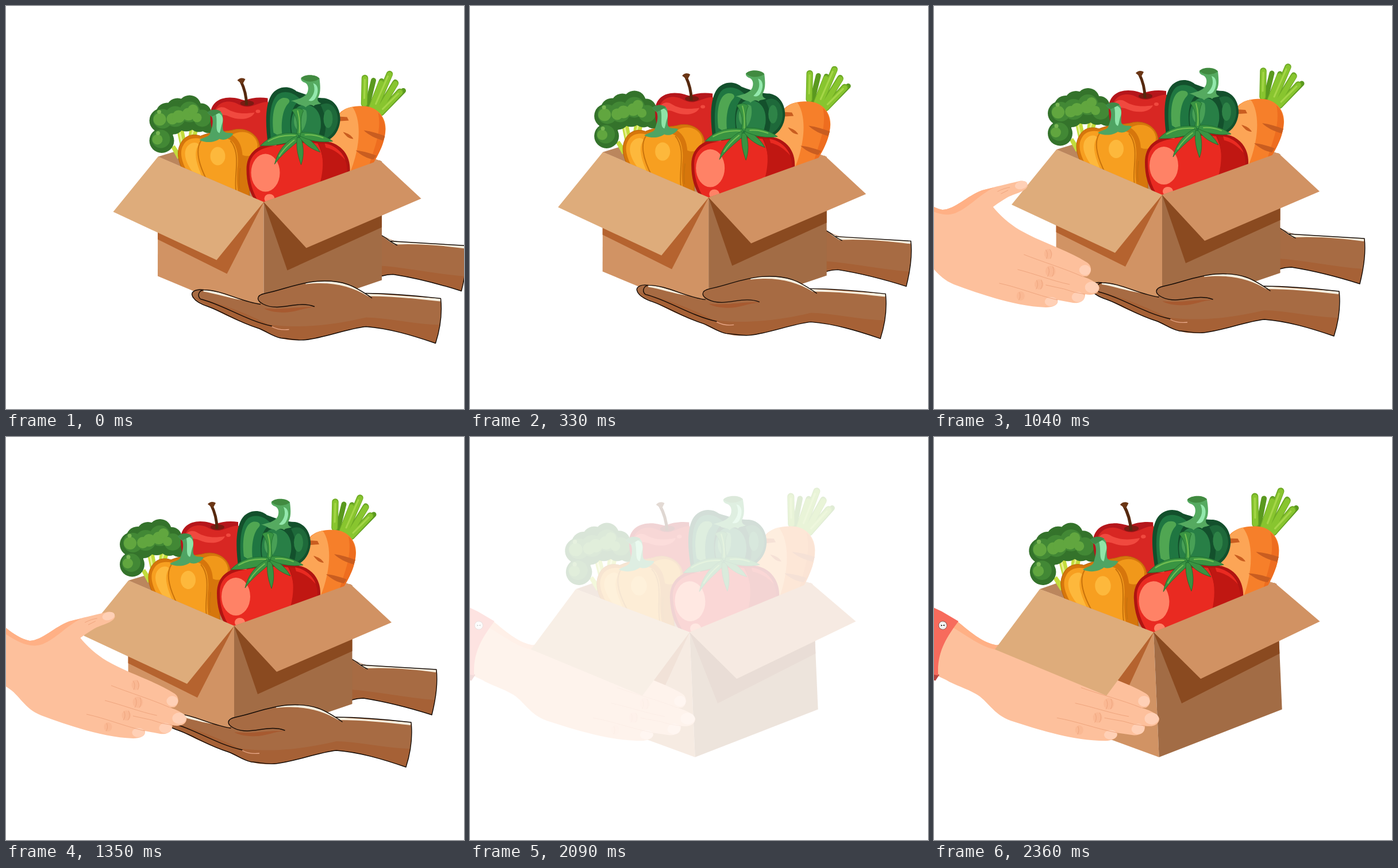
Animation, 797 px wide and 702 px high, one loop 3.46 s. Source, as an HTML page:

```html
<!DOCTYPE html>
<html lang="en">
<head>
<meta charset="utf-8">
<title>Food box</title>
<style>
html, body { margin: 0; width: 100%; height: 100%; overflow: hidden; background: #fff; }
svg { display: block; width: 100vw; height: 100vh; }
.ink { fill: none; stroke: #140b06; stroke-width: 1.4; stroke-linecap: round; stroke-linejoin: round; }
.crease { fill: none; stroke: #eda27b; stroke-width: .9; stroke-linecap: round; }
.stalk { fill: none; stroke-linecap: round; }
</style>
</head>
<body>
<svg viewBox="0 0 797 702">
<defs>
  <g id="broccoli">
    <path fill="#c3dc3c" d="M246 205L257 200 265 240 255 248ZM268 200L284 198 278 222 264 230ZM236 234L242 230 254 248 247 254Z"/>
    <path fill="#e6ef8a" d="M249 206L252 205 259 238 256 240ZM273 203L276 203 271 221 268 222Z"/>
    <g fill="#34732b">
      <circle cx="219.500" cy="222" r="21.500"/><circle cx="219" cy="187" r="21"/><circle cx="229" cy="176" r="20"/>
      <circle cx="247" cy="168" r="20"/><circle cx="268" cy="163" r="20"/><circle cx="288" cy="175" r="18"/>
      <circle cx="302" cy="189" r="20"/><circle cx="262" cy="186" r="20"/><circle cx="240" cy="193" r="18"/>
      <circle cx="284" cy="189" r="18"/><circle cx="224" cy="204" r="17"/>
    </g>
    <g fill="#428835">
      <circle cx="218" cy="219" r="16"/><circle cx="221" cy="184" r="17"/><circle cx="243" cy="180" r="18"/>
      <circle cx="268" cy="172" r="18"/><circle cx="290" cy="183" r="15"/>
    </g>
    <g fill="#61a63f">
      <circle cx="212" cy="220" r="9"/><circle cx="216" cy="185" r="11"/><circle cx="238" cy="184" r="10"/>
      <circle cx="249" cy="180" r="11"/><circle cx="266" cy="176" r="11"/><circle cx="274" cy="168" r="9"/>
      <circle cx="281" cy="182" r="8"/>
    </g>
    <g fill="#78b653"><circle cx="215" cy="172" r="3.500"/><circle cx="213" cy="209" r="3.500"/></g>
  </g>

  <g id="apple">
    <path fill="#b5161b" d="M304 176C305 158 318 147 338 147C350 147 356 150 364 152C376 147 390 146 404 148V240H325C310 220 303 196 304 176Z"/>
    <path fill="#d82723" d="M309 180C311 163 322 153 338 154C352 155 356 164 371 163C385 160 395 153 405 155V235H325C314 215 308 195 309 180Z"/>
    <path fill="#f0493f" d="M313 171C316 163 326 162 332 166C346 175 362 176 381 173C376 186 352 187 337 180C327 175 319 180 313 171Z"/>
    <ellipse cx="387" cy="171" rx="4" ry="3" fill="#f0493f"/>
    <ellipse cx="368" cy="157" rx="12" ry="5" fill="#7c1a12"/>
    <path fill="none" stroke="#56290f" stroke-width="5" d="M357 118C364 132 367 145 367 160"/>
    <path fill="#6b3615" d="M351 117C355 112 361 112 365 115L360 124Z"/>
  </g>

  <g id="carrot">
    <path class="stalk" stroke="#5a991f" stroke-width="9" d="M577 162L588 117M586 165L602 118M595 170L626 120M602 174L640 135"/>
    <path class="stalk" stroke="#6fab25" stroke-width="11.500" d="M572 158L573 113M585 164L602 121M590 167L616 106M597 170L626 122M601 173L634 137"/>
    <path class="stalk" stroke="#88c52f" stroke-width="9" d="M572 158L573 114M585 164L601 122M590 167L616 107M597 170L626 123M601 173L634 138"/>
    <path class="stalk" stroke="#a5d648" stroke-width="3" d="M572 148L573 116M592 158L613 110M604 167L631 140"/>
    <path fill="#f67f2a" d="M525 180C533 165 552 161 572 162C594 163 610 180 609 203C608 226 594 251 579 276L548 290C520 275 508 240 514 214C516 200 521 190 525 180Z"/>
    <path fill="#fca556" d="M526 180C532 170 541 165 551 163C568 186 566 236 544 285C520 275 508 240 514 214C516 200 521 190 526 180Z"/>
    <path fill="#ee6d1f" d="M596 173C612 188 611 215 600 238C594 252 586 264 578 276C584 244 604 212 596 173Z"/>
    <path fill="#c95d20" d="M571 204C585 206 597 210 608 214L605 222C592 218 580 213 571 204ZM557 239C570 240 582 244 593 248L588 255C576 253 566 247 557 239ZM527 180L542 181 545 187 530 188ZM535 207C543 209 550 213 553 219C545 219 540 214 535 207Z"/>
  </g>

  <g id="greenPepper">
    <path fill="#13502c" d="M405 232C399 190 400 160 410 143C420 127 441 125 454 136C470 142 488 148 503 148C521 151 531 168 530 187C528 208 516 220 500 226Z"/>
    <path fill="#1f7641" d="M410 222C405 185 408 152 422 141C437 132 455 142 461 151C443 162 439 190 447 224Z"/>
    <path fill="#50a652" d="M414 208C410 176 416 152 429 148C439 146 445 152 440 157C429 168 426 194 430 218Z"/>
    <path fill="#287f46" d="M450 225C438 188 448 163 464 160C484 157 499 172 496 200L490 225Z"/>
    <path fill="#48a056" d="M450 182C453 168 466 164 471 170C474 182 470 200 462 207C452 204 448 193 450 182Z"/>
    <path fill="#1e693a" d="M496 160C514 150 527 168 526 187C524 206 512 216 500 221C507 204 507 181 496 160Z"/>
    <ellipse cx="509" cy="184" rx="8" ry="16" fill="#2e8347"/>
    <path fill="#55aa60" d="M462 113C468 107 488 106 494 114C496 130 496 140 491 148C490 153 493 156 497 157C490 160 487 158 484 162C479 158 474 160 470 164C466 159 459 161 455 157C451 155 446 152 443 153C455 150 468 148 473 138C476 130 474 122 466 120C463 118 461 116 462 113Z"/>
    <path fill="#94e8ad" d="M483 122C494 125 492 140 487 148C484 153 479 154 475 152C486 142 487 132 483 122Z"/>
    <path fill="#418a40" d="M462 113C468 106 488 106 494 114C487 120 470 122 462 113Z"/>
  </g>

  <g id="orangePepper">
    <path fill="#d6760c" stroke="#ba640a" d="M262 285C249 262 243 243 253 226C260 213 274 209 287 214C305 206 325 207 341 204C366 196 391 212 390 236C390 262 382 285 372 297V340H300Z"/>
    <path fill="#f1981a" d="M342 212C358 202 382 207 386 228C387 244 373 253 360 247C359 232 354 220 342 212Z"/>
    <path fill="#f79f20" d="M268 284C255 262 249 243 257 230C263 218 277 216 288 219C305 212 325 213 335 219C351 224 354 250 351 272C350 290 350 305 354 320L290 300Z"/>
    <path fill="#fdb83c" d="M261 238C265 226 279 222 284 229C272 245 283 270 293 292L280 286C266 268 257 252 261 238Z"/>
    <ellipse cx="317" cy="249" rx="13" ry="16" fill="#fdb83c"/>
    <path fill="none" stroke="#c9730c" stroke-width="2" d="M288 222C276 240 286 268 299 293M339 222C359 245 344 285 349 310M356 270Q353 290 355 306"/>
    <path fill="#4fa463" d="M299 173C306 166 321 167 325 176C328 190 323 202 328 206C332 210 339 207 344 210C339 218 328 223 320 219C312 225 298 227 285 221C292 216 300 216 303 211C307 200 310 190 307 181Z"/>
    <path fill="#8fe4a8" d="M313 173C324 173 329 183 324 194C322 201 322 205 320 209C311 205 318 190 313 173Z"/>
    <path fill="#3f8a48" d="M299 173C306 166 318 167 323 172L307 180Z"/>
  </g>

  <g id="tomato">
    <path fill="#b01411" d="M367 272C367 248 381 231 410 227C440 221 478 221 510 224C535 230 548 250 547 275C546 300 535 320 520 330H385C372 315 367 295 367 272Z"/>
    <path fill="#e92a21" d="M372 272C371 250 385 236 412 232C440 226 475 225 491 227C503 250 503 280 498 302L470 332H390C377 312 372 292 372 272Z"/>
    <path fill="#c01712" d="M493 227C525 227 543 250 542 275C541 285 538 294 535 300L480 330C504 290 503 250 493 227Z"/>
    <path fill="#e92a21" d="M503 227C517 229 533 239 539 256C529 244 516 236 505 234Z"/>
    <ellipse cx="400" cy="278" rx="25" ry="33" fill="#ff8266"/>
    <ellipse cx="407" cy="323" rx="9" ry="8" fill="#ff8266"/>
    <path fill="#f4614d" d="M390 231Q405 222 425 224L418 231Z"/>
    <g fill="#399442" stroke="#1d6a2e" stroke-width=".8">
      <path d="M446 169C452 164 463 165 466 170C460 182 461 200 465 214L453 213C458 198 456 182 446 169Z"/>
      <path d="M456 210C430 206 408 213 391 231C415 231 438 228 458 218Z"/>
      <path d="M454 214C436 222 421 240 416 263C427 247 442 236 459 221Z"/>
      <path d="M455 217C453 236 457 250 462 264C467 250 467 235 462 217Z"/>
      <path d="M459 216C469 230 481 237 495 242C488 229 477 219 464 212Z"/>
      <path d="M460 214C478 223 498 226 517 223C502 212 480 206 462 208Z"/>
    </g>
    <path fill="none" stroke="#74bf52" stroke-width="2" stroke-linecap="round" d="M456 170Q461 188 459 208M452 213Q425 211 405 223M450 221Q433 234 424 249M469 212Q485 211 500 217"/>
  </g>

  <g id="body">
    <path fill="#bb865d" d="M213 250L397 194 602 258 397 329Z"/>
    <path fill="#d29466" d="M580 250L602 258 575 275Z"/>
    <use href="#broccoli"/><use href="#apple"/><use href="#carrot"/>
    <use href="#greenPepper"/><use href="#orangePepper"/><use href="#tomato"/>
    <path fill="#d19364" d="M213 250L397 329V535L212.500 458Z"/>
    <path fill="#b5632f" d="M212.500 370V394L333 454 397 329Z"/>
    <path fill="#a26c45" d="M397 329L602.500 258V465L397 535Z"/>
    <path fill="#8a4a20" d="M397 329L438 448 602.500 373V340Z"/>
  </g>
  <g id="flaps">
    <path fill="#deac7b" d="M135 346L213 250 397 329 315 430Z"/>
    <path fill="#d19263" d="M397 329L599 256 671 323 471 409Z"/>
  </g>

  <g id="farHand">
    <path fill="#a76b43" d="M600 386C610 390 620 397 632 398L749 405C752 432 747 460 741 484C700 471 660 461 622 455Q612 455 600 459Z"/>
    <path fill="#a66136" d="M600 440C645 443 700 455 746 458L741 484C700 471 660 461 622 455Q612 455 600 459Z"/>
    <path fill="#f8f0df" d="M603 388C612 393 620 397 632 398L749 405 748 410C710 405 670 401 624 403Q614 397 603 388Z"/>
    <path class="ink" d="M602 387C611 392 619 400 629 404M618 397L632 398 749 405C752 432 747 460 741 484C700 471 660 461 622 455Q612 455 602 458"/>
  </g>

  <g id="nearHand">
    <path fill="#a76b43" d="M272 490C272 484 281 480 292 482C325 482 355 502 391 507L387 498C387 492 391 490 400 488C430 482 455 470 490 467C530 464 550 473 574 488C615 488 660 492 705 497C708 525 703 553 696 575C655 561 615 549 575 546C540 550 505 565 470 569C452 571 440 566 427 566C412 563 402 554 388 549C350 537 330 522 300 511C285 506 274 500 272 490Z"/>
    <path fill="#a66136" d="M274 494C300 500 345 512 405 542C440 548 500 548 575 530C615 531 660 542 704 543L696 575C655 561 615 549 575 546C540 550 505 565 470 569C440 572 420 567 388 549C350 537 310 517 274 494Z"/>
    <path fill="#a75a30" d="M397 514C430 518 460 510 486 512C464 513 451 523 424 521C410 520 402 517 397 514Z"/>
    <path fill="#f8f0df" d="M470 470C515 461 546 470 574 488L705 497 704 502C660 497 620 493 578 493C548 475 515 467 470 472ZM292 482C315 483 335 492 360 500C335 496 312 488 292 485Z"/>
    <path class="ink" d="M391 507C355 502 325 482 292 482C281 480 272 484 272 490C274 500 285 506 300 511C330 522 350 537 388 549C402 554 412 563 427 566C440 566 452 571 470 569C505 565 540 550 575 546C615 549 655 561 696 575C703 553 708 525 705 497C660 492 615 488 574 488"/>
    <path class="ink" d="M292 482C283 484 281 493 287 498C325 507 365 535 411 545M485 511C465 503 443 511 420 512C400 512 387 503 387 497C387 491 395 489 400 488C430 482 455 470 490 467C535 464 555 475 585 496"/>
    <path fill="none" stroke="#e9a889" stroke-width="1.300" d="M411 546Q424 553 441 551"/>
  </g>

  <g id="hand">
    <path fill="#fdc09c" d="M-130 230L24 313C50 336 66 350 88 355C110 354 130 331 157 321C180 315 200 310 222 305C232 303 237 309 236 314C232 324 212 327 200 334C190 340 181 346 176 350C186 363 205 380 222 390C260 412 306 425 340 447C349 453 348 467 339 471L331 471C345 475 361 484 361 491C360 501 350 505 336 502C337 512 328 519 315 517L288 512C291 520 281 525 268 525C215 523 160 504 108 485C78 473 70 449 50 437C35 427 15 421 0 411L-130 345Z"/>
    <path fill="#ffb085" d="M24 313C50 336 66 350 88 355C110 354 130 331 157 321L178 316C150 330 136 350 110 361C78 372 48 343 16 323Z"/>
    <g fill="#ffd0b6">
      <ellipse cx="336" cy="460" rx="10" ry="9"/><ellipse cx="348" cy="490" rx="12" ry="10"/>
      <ellipse cx="324" cy="507" rx="11" ry="9"/><ellipse cx="277" cy="515" rx="11" ry="8"/>
      <ellipse cx="225" cy="312" rx="11" ry="7" transform="rotate(-14 225 312)"/>
    </g>
    <path class="crease" d="M230 433C260 445 300 457 331 471M219 459C250 467 280 479 309 485M187 483C220 490 250 503 288 512M268 486L300 493Q318 500 336 502M184 323Q196 317 205 316M190 327L202 321"/>
    <g fill="#f9b48e" opacity=".6">
      <ellipse cx="272" cy="432" rx="7" ry="9"/><ellipse cx="276" cy="462" rx="9" ry="10"/>
      <ellipse cx="256" cy="485" rx="8" ry="9"/><ellipse cx="224" cy="505" rx="7" ry="8"/>
    </g>
    <path class="crease" d="M268 425Q273 432 269 440M275 424Q280 432 276 440M272 455Q276 463 271 471M280 454Q284 463 279 471M252 478Q256 486 251 493M260 477Q264 486 259 493M222 499Q225 506 221 512"/>
    <path fill="#b8433e" d="M-24 396L-11 402-18 412-28 408Z"/>
    <path fill="#f76b5c" d="M-40 275L-3 294 25 312C4 338-14 363-13 403L-50 395Z"/>
    <circle cx="-2" cy="318" r="7" fill="#fff" stroke="#8b5a55"/>
    <circle cx="-2" cy="318" r="4.600" fill="none" stroke="#ccc" stroke-width=".8"/>
    <circle cx="-4" cy="318" r="1.200" fill="#333"/><circle cx="0" cy="318" r="1.200" fill="#333"/>
  </g>
</defs>

<g id="offer">
  <g id="carried">
    <use href="#farHand"/><use href="#body"/><use href="#flaps"/><use href="#nearHand"/>
  </g>
  <use id="reach" href="#hand"/>
</g>
<g id="taken">
  <use href="#body" transform="matrix(1.057 -.046 .046 1.057 -52.600 10.600)"/>
  <use href="#hand" transform="matrix(1.02 -.0375 .0375 1.02 5.400 3.700)"/>
  <use href="#flaps" transform="matrix(1.057 -.046 .046 1.057 -52.600 10.600)"/>
</g>
</svg>
<script>
const LOOP = 3460, STEP = 30;
const $ = id => document.getElementById(id);
const show = (el, on) => el.setAttribute('visibility', on ? 'visible' : 'hidden');
const move = (el, x, y) => el.setAttribute('transform', `translate(${x} ${y})`);
const steps = (t, from) => Math.floor((t - from) / STEP);

function draw(t) {
  const taking = t >= 1890;
  show($('offer'), !taking);
  show($('taken'), taking);

  // The box glides in
  const left = 1 - Math.min(17, steps(t, 0)) / 17;
  move($('carried'), 51.5 * left, 12.5 * left);

  // The other hand reaches for it
  const n = t < 1140 ? 0 : steps(t, 1140) + 1;
  show($('reach'), !taking && t >= 1040);
  move($('reach'), (n - 22) * 3.33, 0);

  // The handover fades up
  const k = t < 2090 ? 1 : Math.min(11, steps(t, 2090) + 2);
  $('taken').setAttribute('opacity', k / 11);
}

const start = performance.now();
function tick() {
  draw((performance.now() - start) % LOOP);
  requestAnimationFrame(tick);
}
draw(0);
requestAnimationFrame(tick);
</script>
</body>
</html>
```
